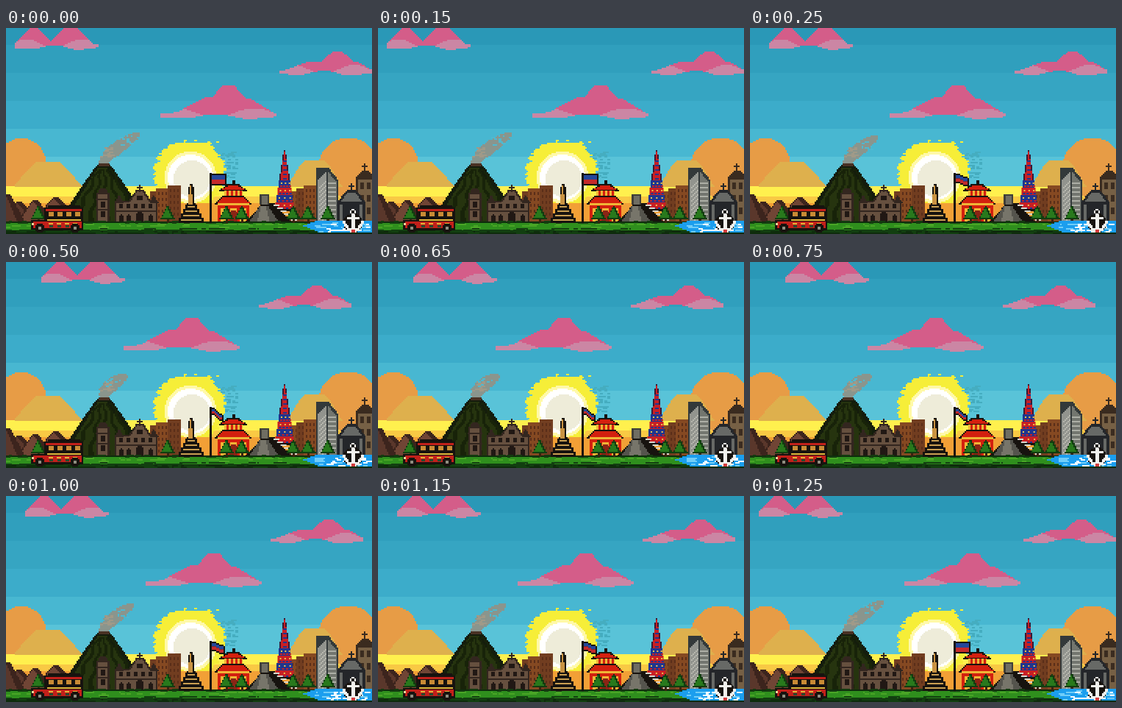
Animation of 498 by 280 pixels, one loop 1.5 s. Source, as an HTML page with a canvas:

```html
<!DOCTYPE html>
<html lang="en">
<head>
<meta charset="utf-8">
<title>Pixel skyline</title>
<style>
html, body { margin: 0; width: 100%; height: 100%; overflow: hidden; background: #3aabc8; }
canvas { display: block; width: 498px; height: 280px; }
</style>
</head>
<body>
<canvas id="stage" width="498" height="280"></canvas>
<script>
const ctx = document.getElementById('stage').getContext('2d');
const CELL = 2, GROUND = 265, INK = '#17130f';
const snap = v => Math.round(v / CELL) * CELL;
const lerp = (a, b, t) => a + (b - a) * t;

function box(color, x, y, w, h) {
  ctx.fillStyle = color;
  ctx.fillRect(x, y, w, h);
}

// Fills rows between y0 and y1; span(y, t) returns the left and right edge.
function rows(color, y0, y1, span) {
  for (let y = snap(y0); y < y1; y += CELL) {
    const [a, b] = span(y, (y + 1 - y0) / (y1 - y0)).map(snap);
    if (b > a) box(color, a, y, b - a, CELL);
  }
}

function taper(color, cx, y0, y1, top, base, power = 1) {
  rows(color, y0, y1, (y, t) => {
    const half = lerp(top, base, t ** power) / 2;
    return [cx - half, cx + half];
  });
}

function disc(color, cx, cy, r) {
  rows(color, cy - r, cy + r, y => {
    const half = Math.sqrt(Math.max(0, r * r - (y + 1 - cy) ** 2));
    return [cx - half, cx + half];
  });
}

function random(seed) {
  return () => (seed = (seed * 16807) % 2147483647) / 2147483647;
}

function speckle(color, seed, count, x, y, w, h, size = 4) {
  const r = random(seed);
  for (let i = 0; i < count; i++) {
    box(color, snap(x + r() * w), snap(y + r() * h), 2 + snap(r() * size), 2);
  }
}

function grid(color, x, y, cols, lines, sx, sy, w, h) {
  for (let j = 0; j < lines; j++)
    for (let i = 0; i < cols; i++) box(color, x + i * sx, y + j * sy, w, h);
}

function arch(color, x, y, w) {
  box(color, x, y + 2, w, GROUND - y - 2);
  box(color, x + 2, y, w - 4, 2);
}

function cross(color, x, y) {
  box(color, x - 1, y, 2, 10);
  box(color, x - 4, y + 3, 8, 2);
}

function tree(x) {
  box('#38220f', x - 1, 256, 3, 9);
  taper('#123d10', x, 242, 259, 2, 20);
  taper('#28791c', x - 1, 244, 257, 1, 13);
}

function sky() {
  ['#2a98b7', '#309fbd', '#36a5c2', '#3cacca', '#48b7d1', '#59c3d8']
    .forEach((c, i) => box(c, 0, i && 23 + (i - 1) * 38, 498, 280));
  box('#fff04e', 0, 215, 498, 65);
  box('#f9c944', 0, 229, 498, 51);
  box('#f2a036', 0, 238, 498, 42);
}

function haze() {
  const back = '#e79c46', front = '#deb04d';
  disc(back, 21, 183, 33);
  box(back, 0, 183, 54, 32);
  taper(front, 57, 181, 215, 26, 92, 0.8);
  disc(back, 466, 190, 41);
  box(back, 440, 190, 58, 25);
  taper(front, 420, 180, 215, 26, 74, 0.8);
}

function sun() {
  const r = random(91);
  speckle('#45adc0', 12, 70, 288, 168, 24, 34);
  rows('#f6ee38', 155, 237, y => {
    const half = 44 * Math.sqrt(Math.max(0, 1 - ((y - 197) / 46) ** 2));
    return [250 - half - r() * 7, 250 + half + r() * 7];
  });
  speckle('#f6ee38', 44, 24, 228, 152, 58, 12, 2);
  disc('#fff9a8', 251, 203, 35);
  disc('#ffffff', 251, 203, 31);
  disc('#eeecd9', 253, 205, 25);
}

// A cloud is a set of flat-topped humps over a wavy, shaded underside.
function cloud(x, base, w, humps) {
  for (let i = 0; i < w; i += CELL) {
    const u = i / w, wave = Math.cos(3 * Math.PI * (u - 0.8));
    const rise = Math.max(...humps.map(([c, h, r]) =>
      h * Math.min(1, 1.2 * (1 - Math.abs(u - c) / r))), 2);
    const top = snap(base - rise);
    const low = snap(base + 3 + 4 * wave * Math.sin(Math.PI * u));
    const shade = Math.max(top, snap(base - 3 - 6 * wave));
    box('#d45d89', x + i, top, CELL, low - top);
    box('#cb86a4', x + i, shade, CELL, Math.max(0, low - shade));
  }
}

function clouds(p) {
  const drift = p * (p + 3) / 10;
  cloud(snap(12 + 35 * drift), 24, 113, [[0.22, 25, 0.25], [0.66, 27, 0.3], [0.6, 10, 0.42]]);
  cloud(snap(209 - 50 * drift), 118 - p * (p - 1), 158, [[0.58, 41, 0.27], [0.45, 24, 0.36], [0.72, 22, 0.28], [0.3, 7, 0.3]]);
  cloud(snap(371 - 28 * drift), 59, 126, [[0.62, 27, 0.3], [0.36, 13, 0.35], [0.78, 14, 0.24]]);
}

function smoke(p) {
  const tipX = 178 - 9 * p, tipY = 142 + 4.5 * p, r = random(31);
  rows('#8a958d', tipY, 185, (y, t) => {
    const x = lerp(132, tipX, (1 - t) ** 1.2), half = 4 + 8 * Math.sin(Math.PI * t ** 0.8);
    return [x - half - 3 * r(), x + half + 3 * r()];
  });
  speckle('#a09a88', 7, 14, 128, 160, 18, 16);
  speckle('#4fb9d0', 9 + p, 9, tipX - 24, tipY + 3, 22, 16);
}

function hills() {
  [[68, 230, 70], [18, 236, 60], [40, 234, 56], [2, 225, 50]].forEach(([x, y, w], i) => {
    taper('#3c241d', x, y, GROUND, 6, w);
    taper(i % 2 ? '#5a372b' : '#704535', x - 3, y + 2, GROUND, 2, w - 16);
  });
  taper('#141c0c', 133, 185, GROUND, 16, 126, 0.95);
  taper('#26340f', 131, 189, GROUND, 10, 104, 0.95);
  for (let i = -2; i <= 2; i++) {
    rows('#182309', 192, GROUND, (y, t) => {
      const x = 133 + i * lerp(4, 23, t) + 2 * Math.sin(y / 4 + i);
      return [x, x + 3 + 4 * t];
    });
  }
  box('#493124', 126, 184, 15, 4);
}

function oldChurches() {
  const dark = '#33261f', stone = '#66503f', hole = '#211814';
  taper(dark, 132, 217, 226, 6, 16);
  box(dark, 123, 224, 18, 41);
  box(stone, 125, 226, 13, 39);
  grid(dark, 122, 232, 1, 2, 0, 14, 20, 2);
  grid(hole, 129, 236, 1, 2, 0, 13, 6, 8);

  taper(dark, 182, 220, 238, 10, 34);
  box(dark, 148, 235, 58, 30);
  taper(stone, 182, 222, 238, 6, 28);
  box(stone, 150, 237, 54, 28);
  [154, 201].forEach(x => taper(dark, x, 228, 237, 2, 12));
  cross(dark, 182, 213);
  box(dark, 148, 248, 58, 2);
  grid(hole, 154, 239, 5, 1, 10, 1, 5, 6);
  [154, 164, 194].forEach(x => arch(hole, x, 253, 6));
  arch(hole, 177, 250, 10);
  disc(hole, 182, 231, 4);
}

function brownTown() {
  [196, 204, 220, 386, 395, 405].forEach((x, i) => {
    const y = 222 - i % 3 * 4;
    box(i % 2 ? '#854922' : '#713d20', x, y, 18, GROUND - y);
    grid('#5a2e19', x + 3, y + 5, 3, 5, 5, 8, 2, 4);
  });
}

function monument() {
  taper(INK, 252, 211, 250, 5, 12);
  taper('#c99342', 251, 214, 250, 2, 8);
  for (let i = 0; i < 4; i++) {
    const w = 16 + 6 * i, y = 240 + 6 * i;
    box(INK, 252 - w / 2, y, w, 7);
    box('#c99f52', 255 - w / 2, y + 2, w - 6, 2);
  }
}

// The cloth sags further from the pole in each pose.
function flag(p) {
  box(INK, 277, 197, 3, 68);
  for (let i = 0; i < 10 - p; i++) {
    const x = 280 + 2 * i, y = snap(197 + p * i * 0.8), h = 16 - 3 * p;
    box(INK, x, y, CELL, h);
    if (i === 9 - p) continue;
    box('#24479a', x, y + 2, CELL, h / 2 - 2);
    box('#c42a2c', x, y + h / 2, CELL, h / 2 - 2);
  }
}

function redGate() {
  const red = '#d3200f', gold = '#f0b536';
  box(INK, 308, 207, 4, 8);
  taper(INK, 309, 212, 221, 14, 38);
  taper(red, 309, 214, 220, 12, 32);
  box(gold, 297, 221, 25, 7);
  grid(red, 300, 221, 4, 1, 6, 1, 3, 7);
  taper(INK, 309, 227, 239, 26, 50);
  taper(red, 309, 229, 237, 24, 44);
  box(gold, 288, 238, 43, 27);
  box(red, 288, 241, 43, 4);
  grid(red, 288, 241, 4, 1, 13, 1, 4, 24);
  arch('#8a2415', 304, 248, 11);
}

function spire() {
  const red = '#c81f24', blue = '#1f358f', gold = '#f0c44b';
  taper('#381a33', 379, 165, 209, 2, 15);
  taper(red, 379, 167, 207, 1, 11);
  for (let y = 180; y < 206; y += 6) box(blue, 377, y, 5, 2);
  [blue, red, blue, red].forEach((c, i) => {
    const w = 16 + 3 * i, y = 207 + 10 * i;
    box(c, 379 - w / 2, y, w, 10);
    grid(gold, 382 - w / 2, y + 3, 3, 1, w / 3, 1, 2, 2);
    grid(i % 2 ? blue : red, 381 - w / 2, y + 7, 4, 1, w / 4, 1, 3, 2);
  });
  box(INK, 365, 246, 28, 3);
}

function pyramid() {
  taper(INK, 357, 238, GROUND, 16, 64);
  taper('#55544d', 351, 241, GROUND, 10, 42);
  taper('#77756a', 350, 241, GROUND, 6, 18);
  for (let y = 240; y < GROUND; y += 4) box('#d9d7cd', 364 + (y - 240) * 1.2, y, 8, 2);
  box('#3f3e38', 345, 226, 13, 14);
  box('#706e63', 348, 228, 8, 12);
}

function rightTown() {
  rows('#33393a', 189, GROUND, y => [422, Math.min(452, 438 + (y - 188) * 0.8)]);
  rows('#92948e', 193, GROUND, y => [Math.max(424, 436 - (y - 193)), 435]);
  rows('#73766f', 194, GROUND, y => [437, Math.min(450, 438 + (y - 194) * 0.8)]);
  for (let y = 208; y < GROUND; y += 6) {
    rows('#b8b8af', y, y + 10, (v, t) => [424 + 10 * (1 - t), 427 + 10 * (1 - t)]);
    box('#adafa6', 438, y + 2, 11, 2);
  }

  box('#3a2b1f', 476, 202, 22, 63);
  box('#766045', 479, 206, 19, 59);
  taper('#3a2b1f', 488, 194, 204, 8, 28);
  cross('#3a2b1f', 488, 184);
  grid('#3b2c20', 482, 210, 2, 3, 9, 17, 5, 9);

  const iron = '#24262a', slate = '#676966';
  cross(iron, 470, 211);
  taper(iron, 470, 220, 238, 10, 38, 0.7);
  taper(slate, 470, 223, 238, 6, 30, 0.7);
  box(iron, 451, 236, 38, 29);
  grid(slate, 454, 240, 4, 1, 9, 1, 4, 25);
  arch(iron, 463, 238, 15);
}

function ground() {
  box('#0e2c0c', 0, 263, 498, 17);
  box('#2f8f1d', 0, 265, 498, 10);
  speckle('#49a526', 15, 45, 0, 265, 420, 5, 12);
  speckle('#123f10', 27, 100, 0, 271, 430, 7, 16);
  speckle('#143b10', 35, 45, 0, 261, 420, 4, 10);
  [44, 220, 300, 321, 391, 411, 438].forEach(tree);
}

function water(p) {
  rows('#1b9eee', 262, 278, y => [404 + Math.abs(y - 268) * 2.6, 498]);
  speckle('#70cdf8', 63 + p, 18, 420, 264, 68, 12, 10);
  speckle('#effaff', 88 + p, 22, 436, 266, 54, 10, 8);
}

function anchor() {
  const white = '#f2f2ee';
  disc(INK, 472, 265, 13);
  disc(white, 472, 250, 4);
  disc(INK, 472, 250, 2);
  box(white, 470, 253, 5, 24);
  box(white, 464, 257, 17, 3);
  for (let i = 0; i < 14; i += 2) {
    const y = snap(278 - i * i / 12);
    box(white, 470 - i, y - 4, 4, 4);
    box(white, 471 + i, y - 4, 4, 4);
  }
  box('#d43d3e', 470, 274, 5, 4);
}

function jeep() {
  const red = '#c2201a', gold = '#e3b63a';
  box(INK, 57, 241, 44, 4);
  box(INK, 52, 244, 53, 31);
  box(red, 54, 246, 49, 3);
  grid('#c98b35', 58, 250, 4, 1, 12, 1, 7, 6);
  box(INK, 34, 261, 22, 13);
  box(red, 37, 263, 66, 9);
  box(gold, 56, 260, 46, 2);
  grid(gold, 58, 265, 4, 1, 11, 1, 6, 2);
  grid('#27492e', 59, 268, 4, 1, 11, 1, 5, 3);
  box('#e8d89a', 35, 265, 3, 3);
  [46, 94].forEach(x => { disc(INK, x, 272, 6); disc('#8f8e80', x, 272, 2); });
}

function draw(p) {
  sky();
  haze();
  sun();
  clouds(p);
  smoke(p);
  hills();
  brownTown();
  oldChurches();
  redGate();
  spire();
  pyramid();
  rightTown();
  ground();
  monument();
  flag(p);
  water(p);
  anchor();
  jeep();
}

// Three held poses, played forwards and then back.
const start = performance.now();
let shown = -1;

function tick() {
  const step = Math.floor((performance.now() - start) % 1500 / 250);
  const pose = Math.min(step, 5 - step);
  if (pose !== shown) draw(shown = pose);
  requestAnimationFrame(tick);
}
tick();
</script>
</body>
</html>
```
